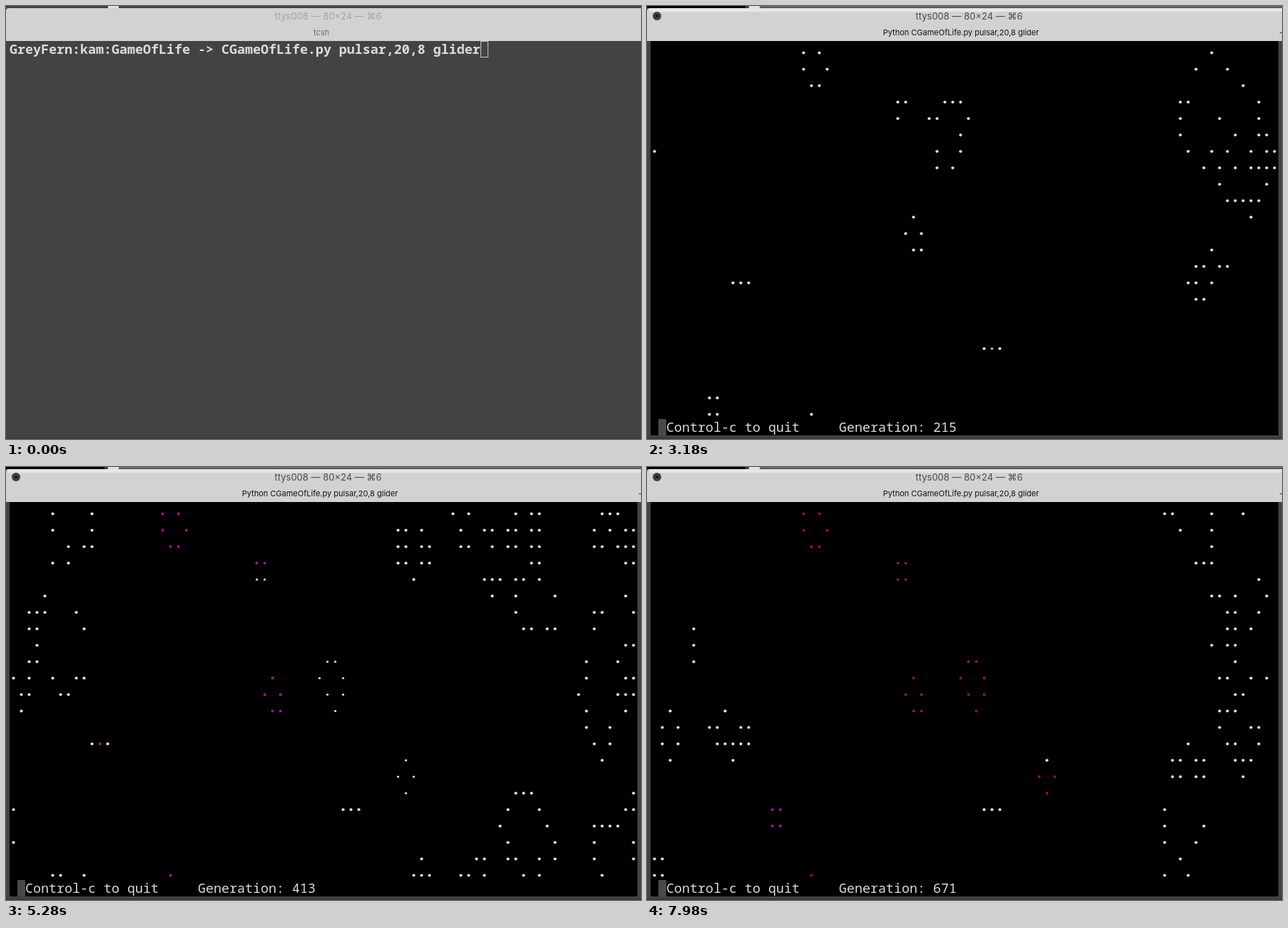
Write an HTML page with a canvas that moves like this. It is 890x606 px and loops after 8000 ms.

```html
<!DOCTYPE html>
<html lang="en">
<head>
<meta charset="utf-8">
<title>Game of Life in a terminal</title>
<style>
html, body { margin: 0; width: 890px; height: 606px; overflow: hidden; background: #444342; }
canvas { display: block; }
</style>
</head>
<body>
<canvas id="stage" width="890" height="606"></canvas>
<script>
const ctx = document.getElementById('stage').getContext('2d');
const LOOP = 8000, START = 1170;
const COLS = 80, ROWS = 23, CELL_W = 11, CELL_H = 23, LEFT = 5, TOP = 49;
const GRAY = '#444342', TEXT = '#dcdcd8', WHITE = '#e6e1e3';
const MONO = '"Noto Sans Mono", "DejaVu Sans Mono", monospace';
const SANS = 'Inter, "DejaVu Sans", sans-serif';

// Time in ms and the generation on screen at that time
const PACE = [[START, 0], [1260, 4], [3180, 215], [4530, 359], [5280, 413], [6840, 562], [7980, 671]];

// Dot style for each hundred generations of age
const STYLES = [[WHITE, 2.1], [WHITE, 1.6], ['#a3149a', 1.9], [WHITE, 2.1], ['#981a14', 1.9], [WHITE, 2.1]];

const at = (x, y) => (y + ROWS) % ROWS * COLS + (x + COLS) % COLS;

// Ages per cell; -1 is dead
function seed() {
  const ages = new Int16Array(COLS * ROWS).fill(-1);
  for (const [x, y] of [[1, 0], [2, 1], [0, 2], [1, 2], [2, 2]]) ages[at(x, y)] = 0;
  for (const bar of [-6, -1, 1, 6])
    for (const d of [2, 3, 4])
      for (const s of [-1, 1]) {
        ages[at(26 + bar, 14 + s * d)] = 0;
        ages[at(26 + s * d, 14 + bar)] = 0;
      }
  return ages;
}

function evolve(ages) {
  const next = new Int16Array(ages.length);
  for (let y = 0; y < ROWS; y++)
    for (let x = 0; x < COLS; x++) {
      let n = 0;
      for (let dy = -1; dy <= 1; dy++)
        for (let dx = -1; dx <= 1; dx++)
          if ((dx || dy) && ages[at(x + dx, y + dy)] >= 0) n++;
      const i = at(x, y), age = ages[i];
      next[i] = n === 3 || (n === 2 && age >= 0) ? age + 1 : -1;
    }
  return next;
}

const history = [seed()];
while (history.length <= 671) history.push(evolve(history[history.length - 1]));

// The screen refreshes after 60 ms and 30 ms in turn
function lastTick(t) {
  const phase = (t - (t < 4590 ? 30 : 0)) % 90;
  return t - phase + (phase >= 60 ? 60 : 0);
}

function generationAt(t) {
  const i = Math.max(1, PACE.findIndex(p => p[0] >= t));
  const [t0, g0] = PACE[i - 1], [t1, g1] = PACE[i];
  const k = Math.min(1, (t - t0) / (t1 - t0));
  return Math.round(g0 + (g1 - g0) * k);
}

function rect(x, y, w, h, color) {
  ctx.fillStyle = color;
  ctx.fillRect(x, y, w, h);
}

function dot(x, y, r, color) {
  ctx.fillStyle = color;
  ctx.beginPath();
  ctx.arc(x, y, r, 0, 2 * Math.PI);
  ctx.fill();
}

function label(text, x, y, font, color, align = 'left') {
  ctx.font = font;
  ctx.textAlign = align;
  ctx.fillStyle = color;
  ctx.fillText(text, x, y);
}

function drawWindow(t) {
  const ready = t >= 30, running = t >= 1400;
  rect(0, 0, 890, 606, GRAY);
  if (ready) {
    rect(0, 0, 138, 3, '#000');
    rect(158, 0, 732, 2, '#6f6f6f');
  }
  rect(143, 0, 15, 4, '#e2e2e0');
  ctx.fillStyle = '#d1d3d0';
  ctx.beginPath();
  ctx.roundRect(0, 3, 890, 46, [4, 0, 0, 0]);
  ctx.fill();
  if (ready) rect(3, 3, 887, 5, '#e6e6e5');
  rect(0, 604, 890, 2, ready ? '#383838' : '#40383b');

  label('ttys008 — 80×24 — ⌘6', 451.5, 19, '13px ' + SANS, ready ? '#4a4a4a' : 'rgba(60,60,60,.3)', 'center');
  const tab = !ready ? 'tcsh' : running ? 'Python CGameOfLife.py pulsar,20,8 glider' : '-tcsh';
  label(tab, ready ? 440 : 442, 41, '11px ' + SANS, ready ? '#111' : 'rgba(40,40,40,.6)', 'center');
  if (!ready) return;
  rect(887, 37, 3, 1, '#333');
  dot(14, 14, 6, '#403f3f');
  if (running) {
    ctx.strokeStyle = '#111';
    ctx.lineWidth = 1.3;
    ctx.beginPath();
    ctx.moveTo(12, 12); ctx.lineTo(16, 16);
    ctx.moveTo(16, 12); ctx.lineTo(12, 16);
    ctx.stroke();
  }
}

function drawPrompt(t) {
  label('GreyFern:kam:GameOfLife -> CGameOfLife.py pulsar,20,8 glider',
    LEFT, 67, '600 18.333px ' + MONO, TEXT);
  if (t < 450) {
    ctx.strokeStyle = '#c4c4c0';
    ctx.lineWidth = 1;
    ctx.strokeRect(665.5, 49.5, 10, 22);
  } else rect(665, TOP, CELL_W, CELL_H, '#5c5b5a');
}

function drawLife(t) {
  const gen = generationAt(lastTick(t));
  rect(LEFT, TOP, COLS * CELL_W, (ROWS + 1) * CELL_H, '#000');
  history[gen].forEach((age, i) => {
    if (age < 0) return;
    const [color, r] = STYLES[Math.min(5, Math.floor(age / 100))];
    dot(10.5 + i % COLS * CELL_W, 65.5 + Math.floor(i / COLS) * CELL_H, r, color);
  });
  rect(16, 578, CELL_W, CELL_H, '#4b4a4a');
  const font = '18.333px ' + MONO;
  label('Control-c to quit', 27, 596, font, TEXT);
  label('Generation: ' + gen, 269, 596, font, TEXT);
}

function frame(now) {
  const t = now % LOOP;
  drawWindow(t);
  if (t < START) drawPrompt(t);
  else drawLife(t);
  requestAnimationFrame(frame);
}
requestAnimationFrame(frame);
</script>
</body>
</html>
```
